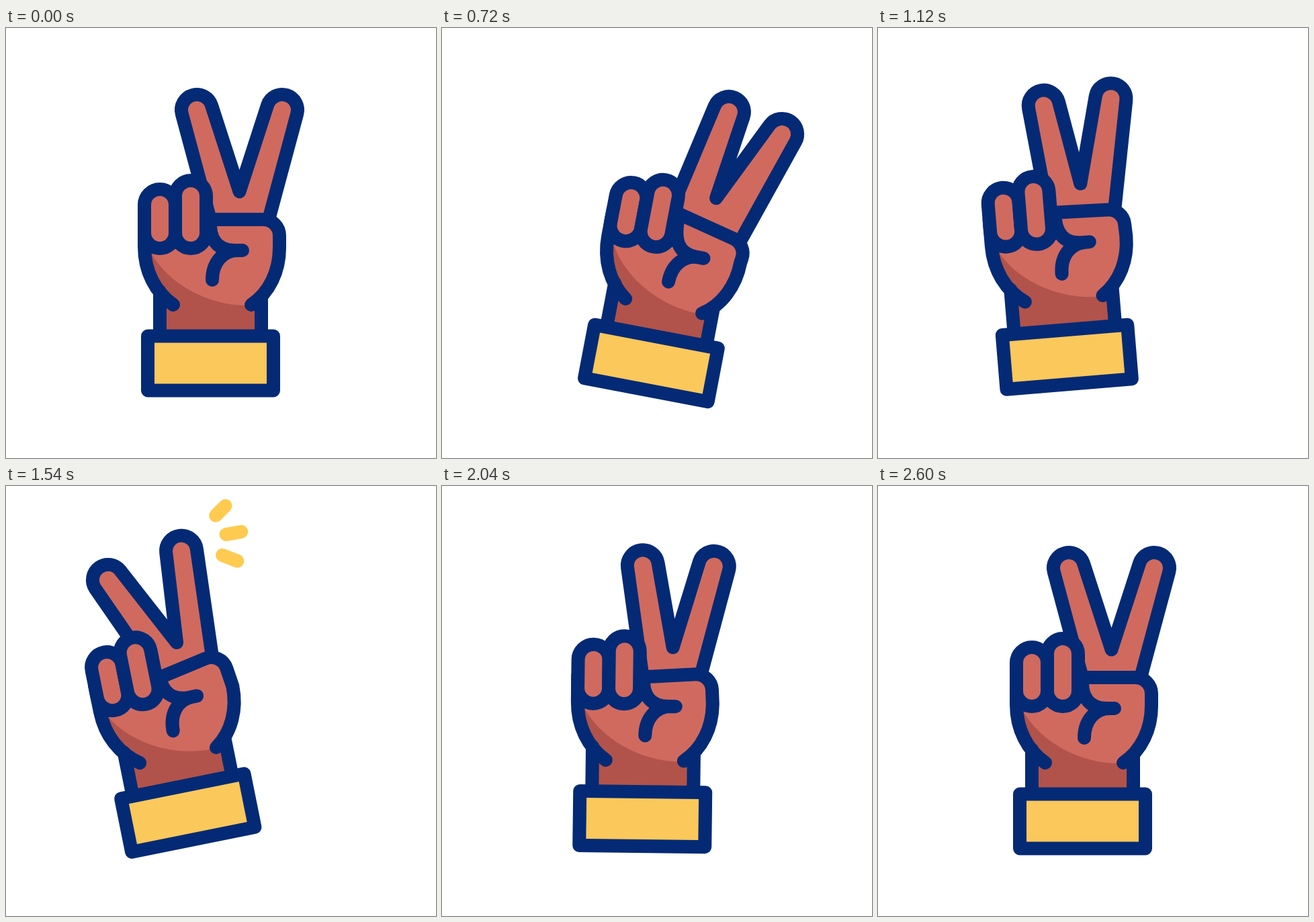
Recreate the animation shown at these times as an HTML page with a canvas. Size 640x640 px, loop 3 s.

```html
<!DOCTYPE html>
<html lang="en">
<head>
<meta charset="utf-8">
<title>Waving peace sign</title>
<style>
  html, body { margin: 0; width: 100%; height: 100%; overflow: hidden; background: #fff; }
  canvas { display: block; }
</style>
</head>
<body>
<canvas id="stage" width="640" height="640"></canvas>
<script>
const ctx = document.getElementById('stage').getContext('2d');
const LOOP = 3000;
const NAVY = '#042a75', SKIN = '#d06a5f', SHADE = '#b1534a', CUFF = '#fbc85b', SPARK = '#fecb50';
const CUFF_X = 304.5, CUFF_Y = 499;

// Keyframes are [time, value]; easing is smooth between each pair.
const tracks = {
  angle: [[210, 0], [710, 10.8], [1356, -11.4], [1740, -11.4], [2200, 5.3], [2600, 0]],
  x: [[210, 0], [703, 7], [1330, -33.7], [1740, -33.7], [2200, 4.2], [2600, 0]],
  y: [[703, 0], [1330, -12.5], [1740, -12.5], [2200, 0]],
  right: [[210, 0], [710, 1], [830, 1], [1400, 0], [1740, 0], [2230, 0.6], [2600, 0]],
  thumbRight: [[210, 0], [710, 1], [830, 1], [1400, 0]],
  left: [[830, 0], [1400, 1], [1740, 1], [2230, 0]],
  head: [[1380, 0], [1620, 1]],
  tail: [[1600, 0], [1860, 1]]
};

// Joints: rest position, offset when bent right, offset when bent left.
const joints = {
  indexTip: [[284, 122], [64, -12], [-27.5, 13.8]],
  middleTip: [[411, 122], [21, 5.6], [-39, -7]],
  fork: [[347.5, 243.5], [6, -4], [-9.3, 3.7]]
};
const thumbJoints = {
  indexBase: [[304, 285], [-14, -12], [-5, 8]],
  middleBase: [[391, 285], [10, 10], [-5, -8]],
  thumbStart: [[304, 285], [0, -12], [0, 8]],
  knuckle: [[407, 285], [4, 14], [-7, -11]]
};

const sparks = [[432.4, 73.4, 17.6, -11.8], [442, 104, 23.8, 0.6], [430.5, 133.2, 20.8, 13.3]];

function valueAt(keys, t) {
  if (t <= keys[0][0]) return keys[0][1];
  for (let i = 1; i < keys.length; i++) {
    const [t0, a] = keys[i - 1], [t1, b] = keys[i];
    if (t < t1) {
      const p = (t - t0) / (t1 - t0);
      return a + (b - a) * p * p * (3 - 2 * p);
    }
  }
  return keys[keys.length - 1][1];
}

function bend(group, right, left) {
  return Object.fromEntries(Object.entries(group).map(([name, [rest, r, l]]) =>
    [name, rest.map((v, i) => v + r[i] * right + l[i] * left)]));
}

function paint(path, fill, stroke) {
  if (fill) { ctx.fillStyle = fill; ctx.fill(path); }
  if (stroke) { ctx.strokeStyle = stroke; ctx.stroke(path); }
}

// Rounded fingertip joined by tangents to the points on either side.
function addTip(path, tip, before, after, r = 23) {
  const tangent = (p, side) => {
    const dx = p[0] - tip[0], dy = p[1] - tip[1];
    return Math.atan2(dy, dx) + side * Math.acos(r / Math.hypot(dx, dy));
  };
  path.arc(...tip, r, tangent(before, 1), tangent(after, -1));
}

function drawRaisedFingers(p) {
  const path = new Path2D();
  path.moveTo(...p.indexBase);
  addTip(path, p.indexTip, p.indexBase, p.fork);
  path.lineTo(...p.fork);
  addTip(path, p.middleTip, p.fork, p.middleBase);
  path.lineTo(...p.middleBase);
  paint(path, SKIN, NAVY);
}

function drawFist(p) {
  paint(new Path2D('M206 325C206 362 222 393 249 412H229V459H380V412H365V330Z'), SHADE);
  paint(new Path2D('M229 392V459M380 392V459'), null, NAVY);

  const outline = new Path2D();
  outline.moveTo(...p.thumbStart);
  outline.arcTo(...p.knuckle, 407, 327, 24);
  outline.lineTo(407, 327);
  outline.bezierCurveTo(407, 362, 392, 394, 365, 412);

  const lit = new Path2D(outline);
  lit.lineTo(358, 413);
  lit.bezierCurveTo(300, 413, 240, 380, 215, 333);
  lit.lineTo(206, 325);
  lit.lineTo(252, 290);
  paint(lit, SKIN);
  paint(outline, null, NAVY);
  paint(new Path2D('M206 285V325C206 362 222 393 249 412'), null, NAVY);

  for (const [x, y] of [[206, 240], [252, 227]]) {
    const finger = new Path2D();
    finger.roundRect(x, y, 46, 328 - y, 23);
    paint(finger, SKIN, NAVY);
  }

  const crease = new Path2D();
  crease.moveTo(...p.thumbStart);
  crease.bezierCurveTo(302, 315, 315, 331, 340, 331);
  crease.lineTo(352, 331);
  crease.moveTo(345, 331);
  crease.bezierCurveTo(322, 331, 307, 350, 307, 375);
  paint(crease, null, NAVY);
}

function drawSparks(head, tail) {
  if (head <= tail) return;
  const path = new Path2D();
  for (const [x, y, dx, dy] of sparks) {
    for (const [k, move] of [[tail, 'moveTo'], [head, 'lineTo']]) {
      path[move](x + dx * 1.3 * k, y + dy * 1.3 * k);
    }
  }
  paint(path, null, SPARK);
}

function draw(t) {
  const now = {};
  for (const name in tracks) now[name] = valueAt(tracks[name], t);
  const pose = {
    ...bend(joints, now.right, now.left),
    ...bend(thumbJoints, now.thumbRight, now.left)
  };

  ctx.fillStyle = '#fff';
  ctx.fillRect(0, 0, 640, 640);
  ctx.save();
  ctx.translate(CUFF_X + now.x, CUFF_Y + now.y);
  ctx.rotate(now.angle * Math.PI / 180);
  ctx.translate(-CUFF_X, -CUFF_Y);
  ctx.lineWidth = 20;
  ctx.lineCap = ctx.lineJoin = 'round';
  drawRaisedFingers(pose);
  drawFist(pose);
  paint(new Path2D('M211 458.5H398V539.5H211Z'), CUFF, NAVY);
  drawSparks(now.head, now.tail);
  ctx.restore();
}

function tick() {
  draw(performance.now() % LOOP);
  requestAnimationFrame(tick);
}
tick();
</script>
</body>
</html>
```
